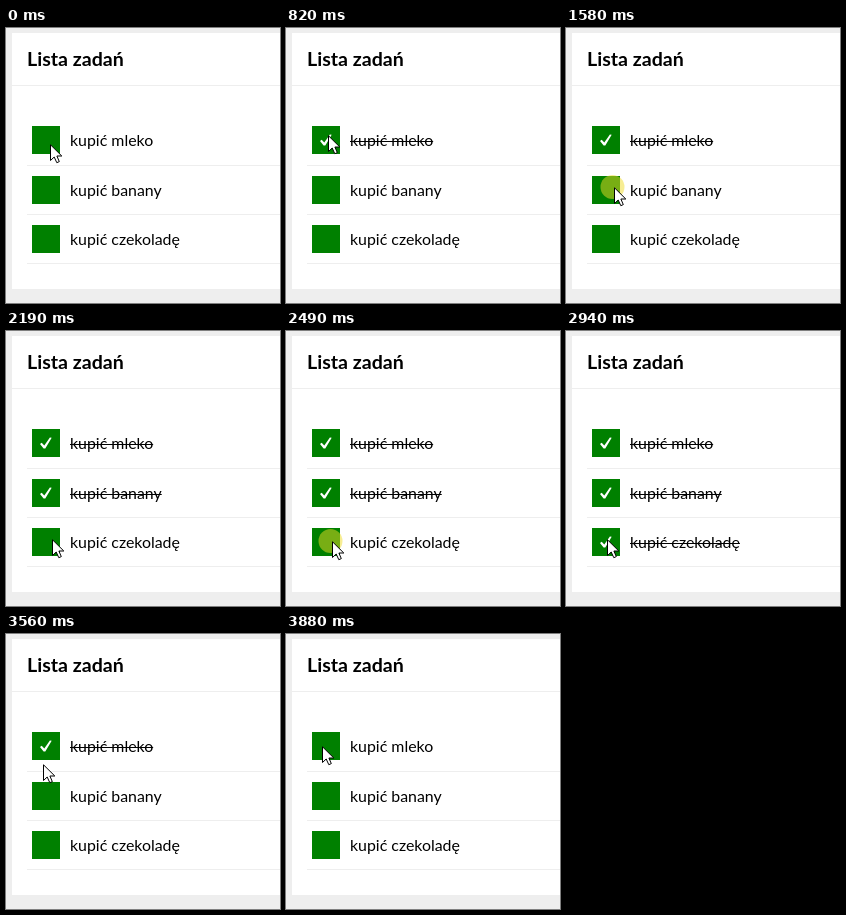
Animation, 274 px wide and 275 px high, one loop 3.95 s. Source, as an HTML page:

```html
<!DOCTYPE html>
<html lang="pl">
<head>
<meta charset="utf-8">
<title>Lista zadań</title>
<style>
html, body { margin: 0; width: 100%; height: 100%; overflow: hidden; background: #eee; }
svg { display: block; width: 274px; height: 275px; }
text { font-family: Lato, sans-serif; font-size: 15.9px; fill: #000; }
.title { font-size: 19.6px; font-weight: 700; }
</style>
</head>
<body>
<svg viewBox="0 0 274 275">
  <path fill="#fff" d="M6 5H274V261H6z"/>
  <path fill="#eee" d="M6 57H274v1H6z"/>
  <text class="title" x="21" y="38">Lista zadań</text>
  <g id="list"></g>
  <circle id="ripple" r="12" fill="#f0dc28" fill-opacity=".5"/>
  <path id="cursor" fill="#fff" stroke="#000"
    d="M.5 .8V16.5L4.2 13L6.8 18.7L9.3 17.6L6.9 12H11.8z"/>
</svg>
<script>
const NS = 'http://www.w3.org/2000/svg';
const LOOP = 3950;
const list = document.getElementById('list');
const cursor = document.getElementById('cursor');
const ripple = document.getElementById('ripple');

function add(tag, attrs, parent = list) {
  const el = document.createElementNS(NS, tag);
  for (const key in attrs) el.setAttribute(key, attrs[key]);
  return parent.appendChild(el);
}

// Ticked from top to bottom, then cleared from bottom to top
const items = [['kupić mleko', 300], ['kupić banany', 1732], ['kupić czekoladę', 2492]]
  .map(([label, on], i) => {
    const y = 98 + Math.round(49.5 * i);
    add('rect', { x: 26, y, width: 28, height: 28, fill: 'green' });
    add('rect', { x: 21, y: Math.floor(137 + 49.3 * i), width: 253, height: 1, fill: '#eee' });
    const text = add('text', { x: 64, y: y + 20 });
    text.textContent = label;
    const done = add('g', {});
    add('path', {
      d: `M34 ${y + 15}l1.7-1.2 2.6 2.7 5.6-8.1 1.8.4-6.4 10.8h-1.7z`,
      fill: '#fff'
    }, done);
    const strike = add('rect', { x: 64, y: y + 15, height: 1 }, done);
    return { text, done, strike, on, off: 3870 - 310 * i };
  });

function measure() {
  for (const { text, strike } of items) {
    strike.setAttribute('width', text.getComputedTextLength());
  }
}

// Pointer stops: time, x, y
const stops = [
  [300, 44, 116], [820, 42, 107], [1580, 48, 159], [1732, 48, 159],
  [2188, 46, 208], [2492, 46, 212], [2940, 41, 208], [3095, 41, 208],
  [3405, 40, 160], [3560, 37, 130], [3715, 36, 112]
];

function pointer(t) {
  const next = stops.findIndex(stop => stop[0] > t);
  if (next < 1) return stops.at(next).slice(1);
  const [t0, x0, y0] = stops[next - 1];
  const [t1, x1, y1] = stops[next];
  const u = (t - t0) / (t1 - t0);
  const ease = u * u * (3 - 2 * u);
  return [x0 + (x1 - x0) * ease, y0 + (y1 - y0) * ease].map(Math.round);
}

// The picture moves in steps and rests after the first and third tick
function snap(t) {
  if (t < 820) return t < 300 ? 0 : 300;
  if (t < 2940) return 820 + 152 * Math.min(11, Math.floor((t - 820) / 152));
  return 2940 + 155 * Math.floor((t - 2940) / 155);
}

function render(time) {
  const t = snap(time);
  const [x, y] = pointer(t);
  const soon = toggle => toggle > t && toggle - t <= 155;
  cursor.setAttribute('transform', `translate(${x} ${y})`);
  ripple.setAttribute('transform', `translate(${x - 1.5} ${y})`);
  ripple.style.display = items.some(({ on, off }) => soon(on) || soon(off)) ? '' : 'none';
  for (const { done, on, off } of items) {
    done.style.display = t >= on && t < off ? '' : 'none';
  }
}

const start = performance.now();
function tick() {
  render((performance.now() - start) % LOOP);
  requestAnimationFrame(tick);
}

measure();
document.fonts.ready.then(measure);
tick();
</script>
</body>
</html>
```
